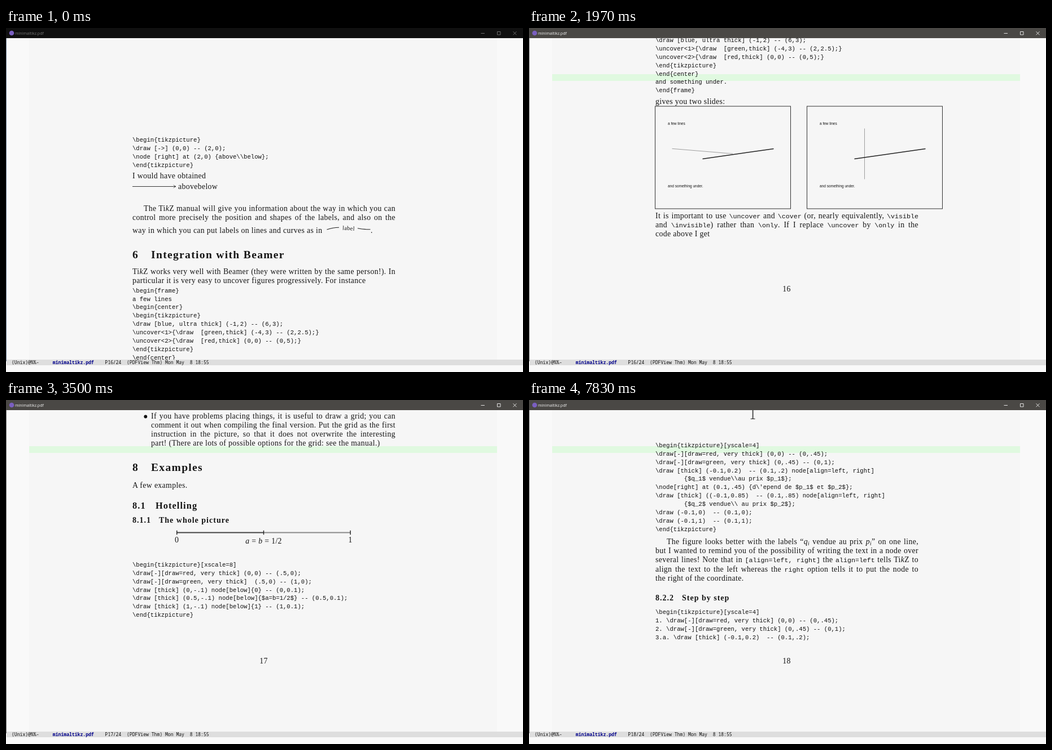
Recreate the animation shown at these times as an HTML page. Size 916 by 611 pixels, loop 8 s.

```html
<!DOCTYPE html>
<html lang="en">
<head>
<meta charset="utf-8">
<title>minimaltikz.pdf</title>
<style>
html, body { margin: 0; width: 100%; height: 100%; overflow: hidden; background: #f9f9f9; }
#stage { position: absolute; left: 0; top: 0; width: 916px; height: 611px; overflow: hidden; background: #f9f9f9; }
#stage div, #stage span.abs, svg { position: absolute; }

/* window frame */
#bar { left: 0; top: 0; width: 916px; height: 18px; background: #101010; color: #777; animation: focus 8s step-end infinite; }
#bar span { position: absolute; left: 16px; top: 0; font: 7.05px/18px "Open Sans", sans-serif; }
#bar svg { left: 0; top: 0; }
#edge { left: 0; top: 18px; width: 1px; height: 574px; background: #6d7f95; animation: edge 8s step-end infinite; }
#mode { left: 1px; top: 589px; width: 915px; height: 10px; background: #dedede; color: #111;
  font: 8.11px/10px "Noto Sans Mono", "DejaVu Sans Mono", monospace; white-space: pre; }
#mode span { position: absolute; top: 0; }
#mode b { color: #00008b; }

/* document */
#view { left: 0; top: 18px; width: 916px; height: 571px; overflow: hidden; }
#paper { left: 41px; top: 0; width: 829px; height: 571px; background: #f6f6f6; }
#band { left: 41px; top: 64px; width: 829px; height: 12px; background: #e0f9e0; animation: band 8s step-end infinite; }
.page { left: 0; top: -18px; width: 916px; height: 1115px; }
.page svg { left: 0; top: 0; }
.t { height: 16px; line-height: 16px; white-space: nowrap; color: #151515;
  font-family: "Liberation Serif", "Times New Roman", serif; font-size: 13.8px; letter-spacing: .35px; }
.j { text-align: justify; text-align-last: justify; }
.c { padding-top: 1px; white-space: pre; color: #111; font-family: "Liberation Mono", "Courier New", monospace; font-size: 10.6px; letter-spacing: 0; }
.t tt { font: 11.67px "Liberation Mono", "Courier New", monospace; line-height: 0; letter-spacing: 0; }
.t sub { font-size: 9.5px; line-height: 0; vertical-align: -2px; }
.h1, .h2, .h3 { font-weight: bold; }
.h1 { font-size: 19.5px; letter-spacing: 1.35px; }
.h2 { font-size: 16.3px; letter-spacing: 1.1px; }
.h3 { font-size: 14px; letter-spacing: 1px; }
.s { font-family: "Liberation Sans", Arial, sans-serif; font-size: 6.5px; letter-spacing: 0; }
.mid { transform: translateX(-50%); }
#ime { left: 108px; top: 41px; width: 9px; height: 9px; border: 1px solid #a5623c; background: #fbeadc; color: #8c3413;
  font: bold 9px/9px "Liberation Sans", sans-serif; text-align: center; animation: ime 8s step-end infinite; }
#arrow { left: 679px; top: 5px; animation: arrow 8s step-end infinite; }

/* timeline */
.p16 { animation: show16 8s step-end infinite; }
.p17 { animation: show17 8s step-end infinite; }
.p18 { animation: show18 8s step-end infinite; }
.page.p16 { animation: show16 8s step-end infinite, roll16 8s step-end infinite; }
.page.p17 { animation: show17 8s step-end infinite, roll17 8s step-end infinite; }
.page.p18 { animation: show18 8s step-end infinite, roll18 8s step-end infinite; }
@keyframes show16 { 0% { opacity: 1 } 36.25%, 100% { opacity: 0 } }
@keyframes show17 { 0%, 88.75%, 100% { opacity: 0 } 36.25% { opacity: 1 } }
@keyframes show18 { 0% { opacity: 0 } 88.75%, 100% { opacity: 1 } }
@keyframes roll16 { 0% { transform: none } 22.875%, 100% { transform: translateY(-504px) } }
@keyframes roll17 { 0% { transform: none } 43.75%, 100% { transform: translateY(-504px) } }
@keyframes roll18 { 0% { transform: none } 97.875%, 100% { transform: translateY(-504px) } }
@keyframes band { 0%, 36.25%, 81.25% { opacity: 0 } 22.875%, 43.75%, 97.875%, 100% { opacity: 1 } }
@keyframes ime { 0%, 24.625%, 100% { opacity: 0 } 22.875% { opacity: 1 } }
@keyframes arrow { 0%, 9.625%, 100% { opacity: 0 } 6.25% { opacity: 1 } }
@keyframes focus { 0% { background: #101010; color: #777 } 6.25%, 100% { background: #4a4845; color: #f4f4f4 } }
@keyframes edge { 0% { background: #6d7f95 } 6.25%, 100% { background: #777 } }
</style>
</head>
<body>
<div id="stage">
  <div id="view">
    <div id="paper"></div>
    <div id="band"></div>
    <div class="page p16"></div>
    <div class="page p17"></div>
    <div class="page p18"></div>
  </div>
  <div id="edge"></div>
  <div id="ime">A</div>
  <div id="mode"><span style="left:9px">(Unix)@%%-     <b>minimaltikz.pdf</b>    P  /24  (PDFView Thm) Mon May  8 18:55</span></div>
  <div id="bar">
    <span>minimaltikz.pdf</span>
    <svg width="916" height="18" fill="none" stroke="currentColor" stroke-width=".9">
      <circle cx="10" cy="9" r="4.3" fill="#7a5fc0" stroke="none"/>
      <path d="M841.5 9.5h6.5M870.5 6.5h5.5v5.5h-5.5zM898.5 6.3l6 6M904.5 6.3l-6 6"/>
    </svg>
  </div>
  <svg id="arrow" width="7" height="11"><path d="M.5 .5v8.5l2-1.8 1.3 3 1.2-.6-1.3-2.9h2.6z" fill="#fff" stroke="#000" stroke-width=".5"/></svg>
</div>
<script>
const LEFT = 224, RIGHT = 690, STEP = 14.85;

// y is the vertical centre of a line
const line = (cls, x, y, html, style = '') =>
  `<div class="t ${cls}" style="left:${x}px;top:${y - 8}px;${style}">${html}</div>`;
const text = (y, html, x = LEFT) => line('', x, y, html);
const full = (y, html, x = LEFT) => line('j', x, y, html, `width:${RIGHT - x}px`);
const mid = (x, y, html) => line('mid', x, y, html);
const esc = s => s.replace(/&/g, '&amp;').replace(/</g, '&lt;');
const code = (y, src) => src.split('\n').map((s, i) => line('c', LEFT, y + i * STEP, esc(s))).join('');
const head = (level, y, num, title) =>
  line('h' + level, LEFT, y, num) + line('h' + level, [257, 265, 271][level - 1], y, title);
const svg = body => `<svg width="916" height="1115" fill="none" stroke="#222">${body}</svg>`;
const path = (d, w = 1, color = '#222') => `<path d="${d}" stroke="${color}" stroke-width="${w}"/>`;
const bullet = y => `<circle cx="247.3" cy="${y}" r="2.9" fill="#111" stroke="none"/>`;

// one framed slide: text heights, thin line, and start of the thick line
function slide(x, y, above, below, thin, tx, ty) {
  return svg(`<rect x="${x - .5}" y="${y + .5}" width="240" height="182" stroke="#333"/>` +
    path(thin, .8, '#888') + path(`M${tx} ${ty}l126-18`, 1.5)) +
    line('s', x + 22, above, 'a few lines') + line('s', x + 22, below, 'and something under.');
}

const TIKZ = 'Ti<i>k</i>Z';

const page16 =
  code(198, String.raw`\begin{tikzpicture}
\draw [->] (0,0) -- (2,0);
\node [right] at (2,0) {above\\below};
\end{tikzpicture}`) +
  text(262.5, 'I would have obtained') +
  text(282, 'abovebelow', 305) +
  svg(path('M224 281.5H300M297 278.8Q298.5 281 301 281.5Q298.5 282 297 284.2', .9) +
    path('M568.5 358Q579 354.3 590 354.2M623 355.8Q634 358 645.5 357.7', 1.1)) +
  line('mid', 606.5, 355, '<span style="display:inline-block;font-size:10.3px;transform:rotate(4deg)">label</span>') +
  full(321, `The ${TIKZ} manual will give you information about the way in which you can`, 244) +
  full(337.3, 'control more precisely the position and shapes of the labels, and also on the') +
  text(360, 'way in which you can put labels on lines and curves as in') + text(360, '.', 646) +
  head(1, 403, '6', 'Integration with Beamer') +
  full(433, `${TIKZ} works very well with Beamer (they were written by the same person!). In`) +
  text(448.5, 'particular it is very easy to uncover figures progressively. For instance') +
  code(465.7, String.raw`\begin{frame}
a few lines
\begin{center}
\begin{tikzpicture}
\draw [blue, ultra thick] (-1,2) -- (6,3);
\uncover<1>{\draw  [green,thick] (-4,3) -- (2,2.5);}
\uncover<2>{\draw  [red,thick] (0,0) -- (0,5);}
\end{tikzpicture}
\end{center}
and something under.
\end{frame}`) +
  text(635, 'gives you two slides:') +
  slide(224, 642.5, 674, 785, 'M253.5 718.3L361 727.3', 307.5, 736.5) +
  slide(493, 642.5, 674, 785, 'M594.5 682.5v90', 576.5, 736.5) +
  full(837.5, 'It is important to use <tt>\\uncover</tt> and <tt>\\cover</tt> (or, nearly equivalently, <tt>\\visible</tt>') +
  full(854, 'and <tt>\\invisible</tt>) rather than <tt>\\only</tt>. If I replace <tt>\\uncover</tt> by <tt>\\only</tt> in the') +
  text(870, 'code above I get') +
  mid(456.5, 968, '16');

const page17 =
  slide(224, 187.5, 247.5, 287, 'M253.5 256.3L361 265.3', 307.5, 274.3) +
  slide(493, 187.5, 219, 330, 'M567.5 227.5v90', 549.5, 281.5) +
  full(382.5, 'Notice how the text changes position. With <tt>\\uncover</tt> the lines are “drawn” on') +
  full(398.7, 'all the slides but made invisible when not called for. With <tt>\\only</tt> the lines are') +
  text(415, 'only drawn when called for.') +
  head(1, 457, '7', 'Hints and tricks') +
  svg(bullet(490) + bullet(533.5)) +
  full(489, 'It takes some time to draw figures. And it is normal to make mistakes.', 257) +
  text(505.3, 'Proceed by trial and error, compiling your code often.', 257) +
  full(532.5, 'If you have problems placing things, it is useful to draw a grid; you can', 257) +
  full(548.7, 'comment it out when compiling the final version. Put the grid as the first', 257) +
  full(565, 'instruction in the picture, so that it does not overwrite the interesting', 257) +
  text(581.2, 'part! (There are lots of possible options for the grid: see the manual.)', 257) +
  head(1, 624, '8', 'Examples') +
  text(655.8, 'A few examples.') +
  head(2, 692, '8.1', 'Hotelling') +
  head(3, 718, '8.1.1', 'The whole picture') +
  svg(path('M302.5 739.5H456.5', 1.8, '#444') + path('M456.5 739.5H610', 1.8, '#8a8a8a') +
    path('M302.7 735.7v7.6M456.5 735.7v7.6M610.2 735.7v7.6', 1.4)) +
  mid(302.7, 753, '0') + mid(456.5, 754.5, '<i>a</i> = <i>b</i> = 1/2') + mid(610.2, 753, '1') +
  code(796, String.raw`\begin{tikzpicture}[xscale=8]
\draw[-][draw=red, very thick] (0,0) -- (.5,0);
\draw[-][draw=green, very thick]  (.5,0) -- (1,0);
\draw [thick] (0,-.1) node[below]{0} -- (0,0.1);
\draw [thick] (0.5,-.1) node[below]{$a=b=1/2$} -- (0.5,0.1);
\draw [thick] (1,-.1) node[below]{1} -- (1,0.1);
\end{tikzpicture}`) +
  mid(456.5, 968, '17');

const sub = (v, n) => `<i>${v}</i><sub>${n}</sub>`;
const at = v => 537.5 - 154 * v;
const tick = (v, w) => path(`M392.7 ${at(v)}h7.8`, w);
const sold = (v, n) => text(at(v) - 8, sub('q', n) + ' vendue', 405) + text(at(v) + 8, 'au prix ' + sub('p', n), 405);

const page18 =
  head(3, 192, '8.1.2', 'Step by step') +
  code(217, String.raw`\begin{tikzpicture}[xscale=8]
1. \draw[-][draw=red, very thick] (0,0) -- (.5,0);
2. \draw[-][draw=green, very thick]  (.5,0) -- (1,0);
3. \draw [thick] (0,-.1) node[below]{0} -- (0,0.1);
4. \draw [thick] (0.5,-.1) node[below]{$a=b=1/2$} -- (0.5,0.1);
5. \draw [thick] (1,-.1) node[below]{1} -- (1,0.1);
\end{tikzpicture}`) +
  head(2, 338, '8.2', 'Pricing') +
  head(3, 364, '8.2.1', 'The whole picture') +
  svg(path(`M396.6 ${at(0)}V${at(.45)}`, 1.8, '#444') + path(`M396.6 ${at(.45)}V${at(1)}`, 1.8, '#8a8a8a') +
    tick(0, 1) + tick(.2, 1.4) + tick(.85, 1.4) + tick(1, 1)) +
  sold(.2, 1) + text(at(.45), `dépend de ${sub('p', 1)} et ${sub('p', 2)}`, 405) + sold(.85, 2) +
  code(584, String.raw`\begin{tikzpicture}[yscale=4]
\draw[-][draw=red, very thick] (0,0) -- (0,.45);
\draw[-][draw=green, very thick] (0,.45) -- (0,1);
\draw [thick] (-0.1,0.2)  -- (0.1,.2) node[align=left, right]
        {$q_1$ vendue\\au prix $p_1$};
\node[right] at (0.1,.45) {d\'epend de $p_1$ et $p_2$};
\draw [thick] ((-0.1,0.85)  -- (0.1,.85) node[align=left, right]
        {$q_2$ vendue\\ au prix $p_2$};
\draw (-0.1,0)  -- (0.1,0);
\draw (-0.1,1)  -- (0.1,1);
\end{tikzpicture}`) +
  full(756, `The figure looks better with the labels “${sub('q', '<i>i</i>')} vendue au prix ${sub('p', '<i>i</i>')}” on one line,`, 244) +
  full(772, 'but I wanted to remind you of the possibility of writing the text in a node over') +
  full(788.3, `several lines! Note that in <tt>[align=left, right]</tt> the <tt>align=left</tt> tells ${TIKZ} to`) +
  full(804.5, 'align the text to the left whereas the <tt>right</tt> option tells it to put the node to') +
  text(820.7, 'the right of the coordinate.') +
  head(3, 855.5, '8.2.2', 'Step by step') +
  code(880, String.raw`\begin{tikzpicture}[yscale=4]
1. \draw[-][draw=red, very thick] (0,0) -- (0,.45);
2. \draw[-][draw=green, very thick] (0,.45) -- (0,1);
3.a. \draw [thick] (-0.1,0.2)  -- (0.1,.2);`) +
  mid(456.5, 968, '18');

const mode = document.getElementById('mode');
[[16, page16], [17, page17], [18, page18]].forEach(([n, html]) => {
  document.querySelector('.page.p' + n).innerHTML = html;
  mode.insertAdjacentHTML('beforeend', `<span class="p${n}" style="left:179.4px">${n}</span>`);
});
</script>
</body>
</html>
```
